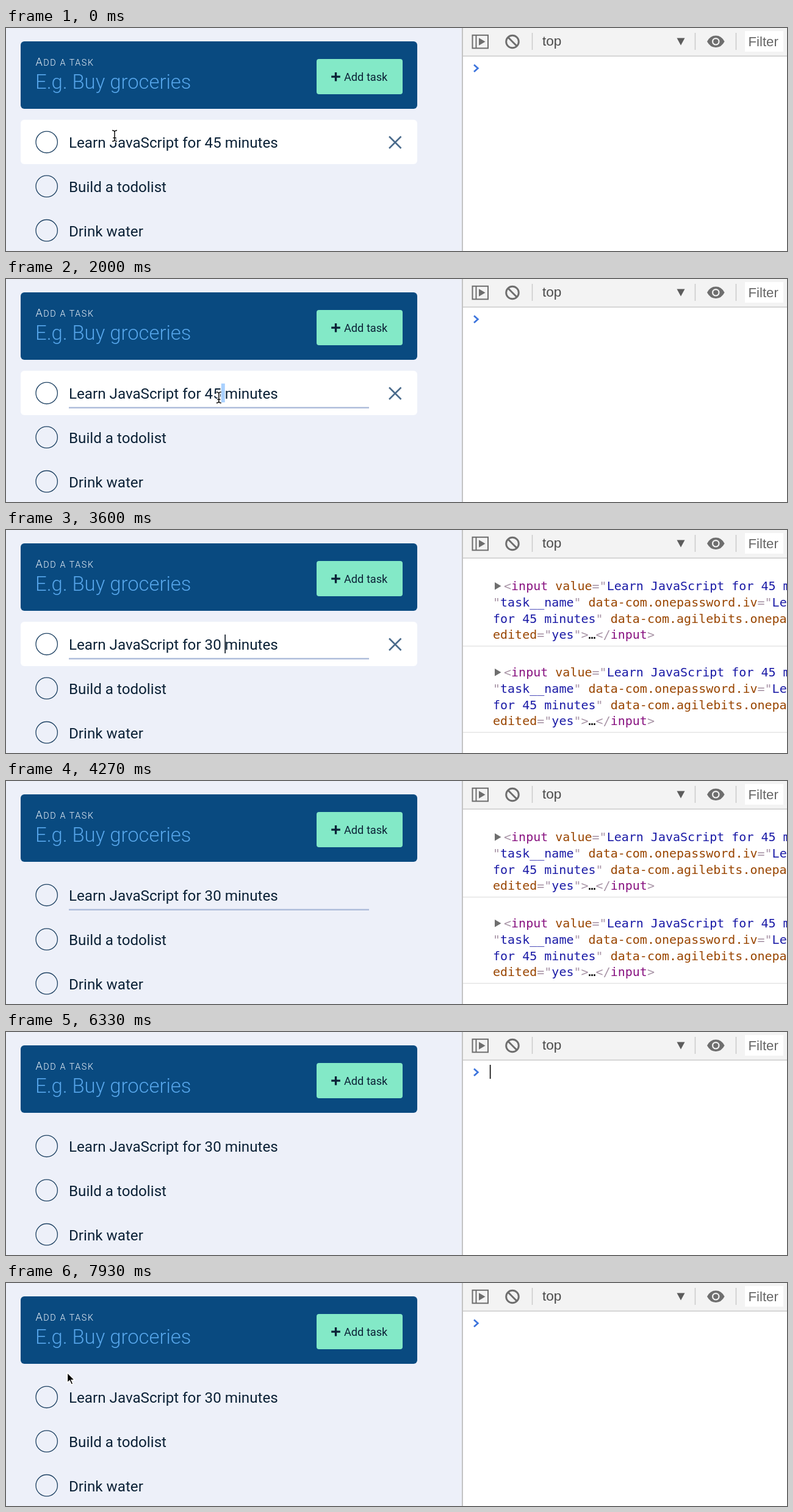
Write an HTML page that moves like this. It is 1280 px wide and 367 px high and loops after 8 s.

```html
<!DOCTYPE html>
<html lang="en">
<head>
<meta charset="utf-8">
<title>Editing a task</title>
<style>
  html, body { margin: 0; width: 100%; height: 100%; overflow: hidden; background: #edf0f9; }
  svg { display: block; }
  text { white-space: pre; }
  .app text { font-family: Roboto, sans-serif; }
  .task { font-size: 24.2px; fill: #0b2136; }
  .ring { fill: none; stroke: #1d4162; stroke-width: 1.3; }
  .bar text { font-family: "Liberation Sans", Arial, sans-serif; }
  .log { font: 20px "DejaVu Sans Mono", monospace; }
  .tag { fill: #881280; }
  .attr { fill: #994500; }
  .val { fill: #1a1aa6; }
  .sym { fill: #a894a6; }
</style>
</head>
<body>
<svg width="1280" height="367" viewBox="0 0 1280 367">
  <defs>
    <g id="entry">
      <path d="M801 86L811.5 92.3L801 98.6Z" fill="#6e6e6e"/>
      <g class="log">
        <text x="816" y="99"><tspan class="sym">&lt;</tspan><tspan class="tag">input</tspan> <tspan class="attr">value</tspan><tspan class="sym">="</tspan><tspan class="val">Learn JavaScript for 45 minutes</tspan></text>
        <text x="798" y="126"><tspan class="sym">"</tspan><tspan class="val">task__name</tspan><tspan class="sym">"</tspan> <tspan class="attr">data-com.onepassword.iv</tspan><tspan class="sym">="</tspan><tspan class="val">Learn</tspan></text>
        <text x="798" y="152.5"><tspan class="val">for 45 minutes</tspan><tspan class="sym">"</tspan> <tspan class="attr">data-com.agilebits.onepassword</tspan></text>
        <text x="798" y="179"><tspan class="attr">edited</tspan><tspan class="sym">="</tspan><tspan class="val">yes</tspan><tspan class="sym">"&gt;</tspan>…<tspan class="sym">&lt;/</tspan><tspan class="tag">input</tspan><tspan class="sym">&gt;</tspan></text>
      </g>
      <path d="M749 191.2H1280" stroke="#e9e9e9" stroke-width="1.8"/>
    </g>
  </defs>

  <rect width="748" height="367" fill="#edf0f9"/>
  <g class="app">
    <rect x="24" y="22" width="650" height="111" rx="6" fill="#094a80"/>
    <text x="48.5" y="62" fill="#f2f7fc" font-size="18" font-weight="300" letter-spacing="1.6">A<tspan font-size="14.3">DD A TASK</tspan></text>
    <text x="48" y="100" fill="#55a4e8" font-size="32.8" font-weight="300">E.g. Buy groceries</text>
    <rect x="509" y="51" width="141" height="58" rx="4" fill="#83e9c7"/>
    <path d="M533.2 80.2H547.8M540.5 73V87.4" stroke="#0b2136" stroke-width="3.3"/>
    <text x="554" y="87" fill="#0b2136" font-size="18.2">Add task</text>

    <g id="hover">
      <rect x="24" y="151" width="650" height="73" rx="6" fill="#fff"/>
      <path d="M628 178.5L647.5 198M647.5 178.5L628 198" stroke="#496a8b" stroke-width="2.5"/>
    </g>
    <rect id="sel" y="172" height="31" fill="#a9d1ff"/>
    <circle class="ring" cx="66.7" cy="187.8" r="17.7"/>
    <circle class="ring" cx="66.7" cy="260.5" r="17.7"/>
    <circle class="ring" cx="66.7" cy="333.2" r="17.7"/>
    <text id="task" class="task" x="103" y="197.3">Learn JavaScript for 45 minutes</text>
    <text class="task" x="103" y="270">Build a todolist</text>
    <text class="task" x="103" y="342.7">Drink water</text>
    <rect id="line" x="103" y="210.6" width="492" height="2.4" fill="#adbcda"/>
    <rect id="caret" y="172" width="1.6" height="31" fill="#0b1520"/>
  </g>

  <rect x="748" width="532" height="367" fill="#fff"/>
  <use id="log1" href="#entry"/>
  <use id="log2" href="#entry" y="142"/>
  <g id="prompt">
    <path d="M767 60.4L773.4 66.2L767 72" fill="none" stroke="#3c74dd" stroke-width="2.7"/>
    <rect id="bar" x="792.8" y="54" width="1.7" height="23" fill="#111"/>
  </g>

  <g class="bar">
    <rect x="748" width="532" height="46" fill="#f3f3f3"/>
    <path d="M748 46.3H1280" stroke="#cbcbcb" stroke-width="1.6"/>
    <path d="M748 0V367" stroke="#c3c3c3" stroke-width="2"/>
    <g fill="none" stroke="#6e6e6e" stroke-width="2">
      <rect x="764.5" y="11.8" width="25.5" height="21.5"/>
      <path d="M770.5 12V33"/>
      <circle cx="830" cy="22.5" r="10.3" stroke-width="2.9"/>
      <path d="M822.8 15.3L837.2 29.7" stroke-width="2.9"/>
    </g>
    <path d="M775 16.2L785.5 22.5L775 28.8Z" fill="#6e6e6e"/>
    <path d="M862.5 8V36M1129.5 8V36M1196.5 8V36" stroke="#cacaca" stroke-width="1.5"/>
    <text x="879" y="29.3" font-size="22.6" fill="#4a4a4a">top</text>
    <path d="M1099.5 16.5H1112.5L1106 28.5Z" fill="#5c5c5c"/>
    <path d="M1149 22.3Q1154 12.6 1163.3 12.6T1177.6 22.3Q1172.6 32 1163.3 32T1149 22.3Z" fill="#6e6e6e"/>
    <circle cx="1163.3" cy="22.3" r="5.2" fill="#6e6e6e" stroke="#f3f3f3" stroke-width="2.2"/>
    <rect x="1211" y="5" width="63" height="34" fill="#fff"/>
    <text x="1216.5" y="30.3" font-size="22.2" fill="#666">Filter</text>
  </g>

  <g id="beam" fill="none">
    <path id="ibar" d="M-4 -9Q0 -9 0 -6V6Q0 9 -4 9M4 -9Q0 -9 0 -6M0 6Q0 9 4 9M-2.6 3.2H2.6" stroke="#fff" stroke-width="3.8"/>
    <use href="#ibar"/>
    <path d="M-4 -9Q0 -9 0 -6V6Q0 9 -4 9M4 -9Q0 -9 0 -6M0 6Q0 9 4 9M-2.6 3.2H2.6" stroke="#111" stroke-width="1.5"/>
  </g>
  <path id="arrow" d="M0 0V16.6L3.8 13.2L6.6 19.6L9.4 18.4L6.7 12.2H12Z" fill="#000" stroke="#fff" stroke-width="1.4"/>
</svg>
<script>
const LOOP = 8000, LEFT = 103;
const PRESS = 1700, KEYS = [2600, 2900, 3270], UNHOVER = 3870;
const BLUR = 5170, CLEAR = 5730, WAKE = 6400;

// Pointer way points: time, x, y, and whether the leg is eased
const way = [
  [0, 178, 177.5], [270, 178, 177.5], [1450, 360, 194, 1], [1850, 360, 195],
  [2000, 349, 195], [2130, 323, 195], [6400, 345, 195], [6600, 216, 185],
  [6900, 160, 180], [7550, 100.5, 147.5, 1]
];

const el = id => document.getElementById(id);
const show = (id, on) => el(id).style.display = on ? '' : 'none';
const move = (id, x, y) => el(id).setAttribute('transform', `translate(${x} ${y})`);
const task = el('task');
const edge = n => LEFT + (n ? task.getSubStringLength(0, n) : 0);
const blink = (t, start) => (t - start + LOOP) % 1000 < 500;

function pointer(t) {
  const i = way.findIndex(p => p[0] > t);
  if (i < 0) return way[way.length - 1].slice(1, 3);
  const a = way[i - 1], b = way[i];
  let k = (t - a[0]) / (b[0] - a[0]);
  if (b[3]) k = k * k * (3 - 2 * k);
  return [a[1] + (b[1] - a[1]) * k, a[2] + (b[2] - a[2]) * k];
}

function draw(t) {
  const [x, y] = pointer(t);
  const typed = KEYS.filter(k => t >= k).length;
  const value = typed ? '30 '.slice(0, typed) : '45 ';
  const text = `Learn JavaScript for ${value}minutes`;
  if (task.textContent !== text) task.textContent = text;

  const visible = t < KEYS[0] || t >= WAKE;
  const hovered = t < UNHOVER || (t >= WAKE && y > 151);
  const overText = x > LEFT && x < 595 && y > 168 && y < 213;
  show('hover', hovered);
  show('beam', visible && overText);
  show('arrow', visible && !overText);
  move('beam', x, y);
  move('arrow', x, y);

  const focused = t >= PRESS && t < BLUR;
  show('line', focused);
  const selecting = focused && !typed;
  show('sel', selecting);
  if (selecting) {
    const from = x > 356 ? 24 : x > 346.5 ? 23 : x > 332.5 ? 22 : 21;
    el('sel').setAttribute('x', edge(from));
    el('sel').setAttribute('width', edge(24) - edge(from));
  }
  const typing = t < 3430;
  show('caret', focused && typed && (typing || blink(t, 3430)));
  if (typed) el('caret').setAttribute('x', edge(21 + typed) - 0.4);

  const logs = t < CLEAR ? typed : 0;
  show('log1', logs > 0);
  show('log2', logs > 1);
  move('prompt', 0, logs * 142);
  show('bar', t >= BLUR && blink(t, 5150));
}

function tick() {
  draw(performance.now() % LOOP);
  requestAnimationFrame(tick);
}
tick();
</script>
</body>
</html>
```
